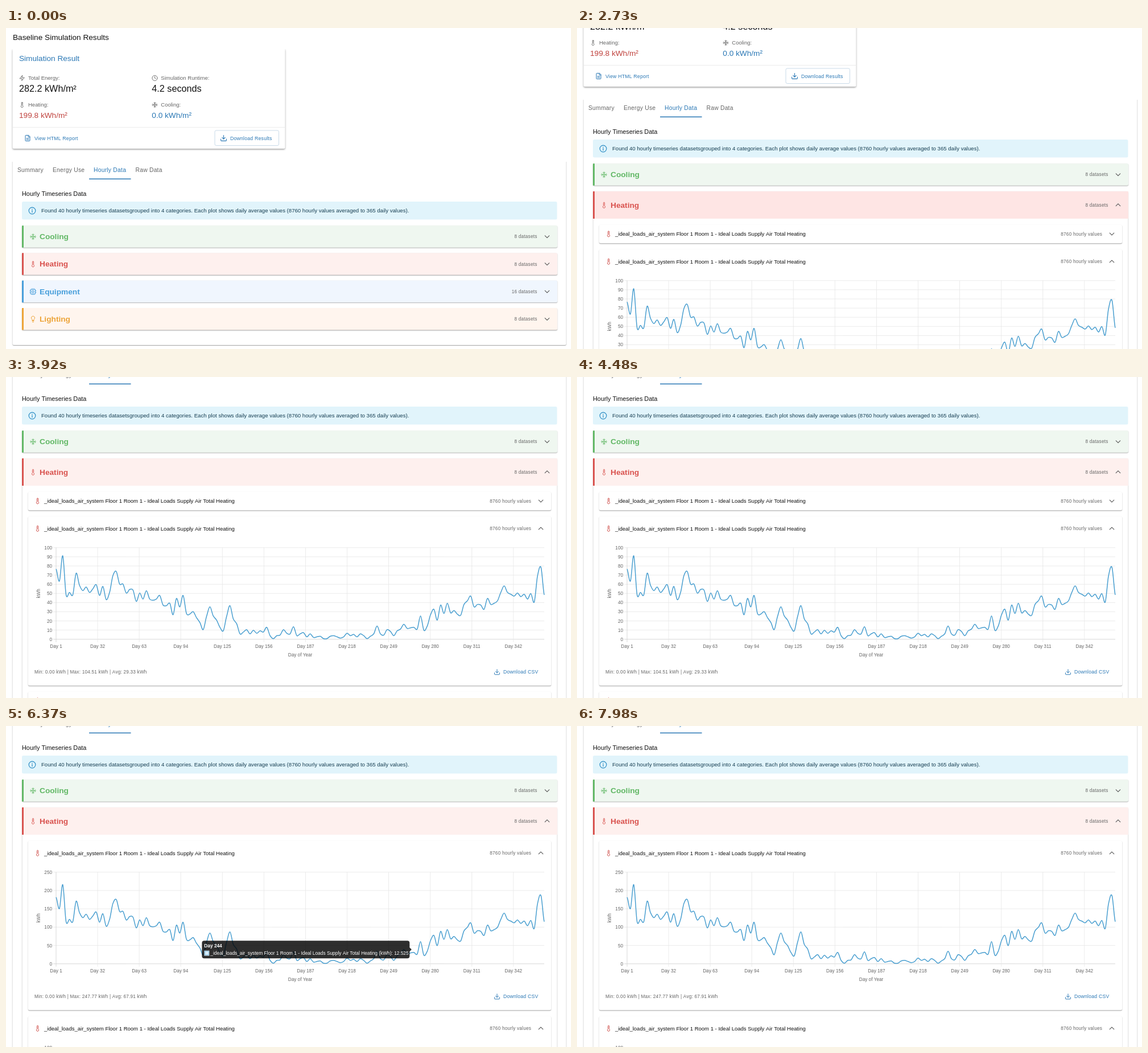
Animation of 993 by 564 pixels, one loop 8000 ms. Source, as an HTML page with a canvas:

```html
<!DOCTYPE html>
<html lang="en">
<head>
<meta charset="utf-8">
<title>Baseline Simulation Results</title>
<style>
html, body { margin: 0; width: 100%; height: 100%; overflow: hidden; background: #fff; }
canvas { display: block; width: 993px; height: 564px; }
</style>
</head>
<body>
<canvas id="stage"></canvas>
<script>
const W = 993, H = 564, LOOP = 8000, STEP = 70;
const canvas = document.getElementById('stage');
const ratio = window.devicePixelRatio || 1;
canvas.width = W * ratio;
canvas.height = H * ratio;
const c = canvas.getContext('2d');

const BLUE = '#2b78b5', GREY = '#666', RED = '#cf4f4a', LINE = '#4a9fd0';
const NAME = '_ideal_loads_air_system Floor 1 Room 1 - Ideal Loads Supply Air Total Heating';

const ICONS = {
  zap: 'M13 2 3 14h9l-1 8 10-12h-9z',
  clock: 'M22 12a10 10 0 1 1-20 0a10 10 0 1 1 20 0M12 6v6l4 2',
  info: 'M22 12a10 10 0 1 1-20 0a10 10 0 1 1 20 0M12 17v-6M12 7v1',
  thermo: 'M14 4v10.5a4 4 0 1 1-4 0V4a2 2 0 0 1 4 0z',
  snow: 'M2 12h20M12 2v20M20 16l-4-4 4-4M4 8l4 4-4 4M16 4l-4 4-4-4M8 20l4-4 4 4',
  file: 'M15 2H6a2 2 0 0 0-2 2v16a2 2 0 0 0 2 2h12a2 2 0 0 0 2-2V7zM14 2v6h6M8 13h8M8 17h8',
  load: 'M21 15v4a2 2 0 0 1-2 2H5a2 2 0 0 1-2-2v-4M7 10l5 5 5-5M12 15V3',
  chip: 'M4 4h16v16H4zM9 9h6v6H9zM9 1v3M15 1v3M9 20v3M15 20v3M1 9h3M1 15h3M20 9h3M20 15h3',
  bulb: 'M15 15c0-2 .7-2.7 1.5-3.5A6 6 0 1 0 7.500 11.500C8.300 12.300 9 13 9 15zM9 18h6M10 22h4',
  chevron: 'M5 9l7 7 7-7'
};

// Daily heating demand at even steps through the year, as plot height.
const demand = [
  117, 97, 139, 74, 78, 74, 110, 90, 81, 87, 78, 84, 91, 73, 88, 66, 78, 106, 113, 92, 92,
  77, 83, 82, 63, 77, 67, 81, 67, 65, 67, 73, 57, 56, 60, 41, 68, 54, 73, 43, 42,
  46.053, 36, 28, 16, 38, 54, 39, 32, 20, 14, 38, 56, 34, 26, 9, 12, 16, 9, 15, 10,
  14, 12, 20, 6, 1, 6, 7, 16, 10, 9, 21, 6, 9, 11, 4, 9, 3, 4, 5, 1,
  1, 5, 6, 4, 2, 4, 10, 6, 8, 4, 9, 6, 1, 5, 9, 22, 9, 7, 16, 13,
  6, 14, 17, 25, 18, 19, 20, 17, 39, 15, 22, 41, 50, 32, 57, 43, 60, 44, 48, 42,
  40, 58, 64, 72, 54, 58, 57, 50, 68, 58, 60, 64, 78, 89, 78, 75, 72, 77, 71, 75,
  67, 76, 62, 106, 120, 74];
const LEFT = 88, WIDTH = 858, PLOT = 161, LAST = demand.length - 1;

const clamp = p => Math.max(0, Math.min(1, p));
const mix = (a, b, p) => a + (b - a) * p;
const ease = p => { p = clamp(p); return p * p * (3 - 2 * p); };

function text(s, x, y, size, color = '#111', o = {}) {
  c.font = `${o.bold ? 'bold ' : ''}${size}px "Liberation Sans", Arial, sans-serif`;
  c.letterSpacing = (o.gap || 0) + 'px';
  c.textAlign = o.align || 'left';
  c.fillStyle = color;
  c.fillText(s, x, y + size * 0.36);
}
const caption = (s, x, y, align) => text(s, x, y, 8.2, GREY, { gap: 0.22, align });
const button = (s, x, y) => text(s, x, y, 8.7, BLUE, { gap: 0.22 });

function icon(name, x, y, size, color, turn = 0) {
  c.save();
  c.translate(x, y);
  c.rotate(turn * Math.PI);
  c.scale(size / 24, size / 24);
  c.translate(-12, -12);
  c.strokeStyle = color;
  c.lineWidth = 2;
  c.lineCap = c.lineJoin = 'round';
  c.stroke(new Path2D(ICONS[name]));
  c.restore();
}
const chevron = (x, y, open) => icon('chevron', x, y, 13, '#555', -open);

function rect(x, y, w, h, color) {
  c.fillStyle = color;
  c.fillRect(x, y, w, h);
}
function line(x1, y1, x2, y2, color, width = 0.8) {
  c.strokeStyle = color;
  c.lineWidth = width;
  c.beginPath();
  c.moveTo(x1, y1);
  c.lineTo(x2, y2);
  c.stroke();
}
function round(x, y, w, h, r, color) {
  c.fillStyle = color;
  c.beginPath();
  c.roundRect(x, y, w, h, r);
  c.fill();
}
function paper(x, y, w, h, color = '#fff', blur = 1.5, drop = 0.9) {
  c.save();
  c.shadowColor = 'rgba(0,0,0,.38)';
  c.shadowBlur = blur * ratio;
  c.shadowOffsetY = drop * ratio;
  round(x, y, w, h, 2.5, color);
  c.restore();
}

function result() {
  text('Baseline Simulation Results', 12, 16.5, 13.63);
  paper(11.5, 36, 479, 176, '#fff', 3, 1.4);
  rect(8, 30, 486, 7, '#fff');
  text('Simulation Result', 23, 53.5, 13.63, BLUE);
  const stats = [
    ['zap', 'Total Energy:', '282.2 kWh/m²', 0, 0, '#111', 16.2],
    ['clock', 'Simulation Runtime:', '4.2 seconds', 1, 0, '#111', 16.2],
    ['thermo', 'Heating:', '199.8 kWh/m²', 0, 1, '#c0443f', 13.65],
    ['snow', 'Cooling:', '0.0 kWh/m²', 1, 1, BLUE, 13.65]];
  for (const [sign, label, value, col, row, color, size] of stats) {
    const x = 23 + col * 233.3, y = 87.5 + row * 47;
    icon(sign, x + 5.2, y + 0.5, 11, GREY);
    text(label, x + 16, y, 9.5, GREY);
    text(value, x, y + 18.5, size, color);
  }
  line(11, 174.5, 491, 174.5, '#e8e8e8');
  icon('file', 38, 193.5, 12, BLUE);
  button('View HTML Report', 50, 193.5);
  c.strokeStyle = '#c3d6e6';
  c.lineWidth = 0.9;
  c.beginPath();
  c.roundRect(367, 180, 112.5, 26.5, 2.5);
  c.stroke();
  icon('load', 382.5, 193.5, 13, BLUE);
  button('Download Results', 394, 193.5);
}

function panel(bottom) {
  paper(11.5, 232, 973, bottom - 232);
  rect(5, 226, 985, 9, '#fff');
  [['Summary', 20], ['Energy Use', 82], ['Hourly Data', 154], ['Raw Data', 227.5]].forEach(([s, x], i) =>
    text(s, x, 249.5, 10.3, i === 2 ? BLUE : GREY, { gap: 0.25 }));
  rect(146, 264.5, 73.5, 1.5, BLUE);
  text('Hourly Timeseries Data', 28, 291.5, 10.9);
  round(28, 305, 940.5, 31.5, 2.5, '#e1f4fb');
  icon('info', 46, 321, 14, '#2a8cc4');
  text('Found 40 hourly timeseries datasetsgrouped into 4 categories. Each plot shows daily average values ' +
    '(8760 hourly values averaged to 365 daily values).', 62, 320.5, 9.62, '#173f52');
}

function section(y, h, sign, label, count, color, bg, open = 0) {
  if (open < 1) paper(28, y, 941, h, bg);
  else rect(28, y, 941, h, bg);
  rect(28, y, 3, h, color);
  const mid = y + h / 2;
  icon(sign, 47.5, mid + 0.3, 12, color);
  text(label, 59, mid, 13.7, color, { bold: true });
  caption(count + ' datasets', 933.5, mid, 'right');
  chevron(951, mid, open);
}

function plot(top, max, step, scale) {
  const base = top + PLOT;
  for (let v = 0; v <= max; v += step) {
    const y = base - v / max * PLOT;
    line(83, y, LEFT + WIDTH, y, v ? '#e6e6e6' : '#cfcfcf');
    text(v, 81, y, 8.2, GREY, { align: 'right' });
  }
  for (let day = 1; day < 365; day += 31) {
    const x = LEFT + (day - 1) / 364 * WIDTH;
    line(x, top, x, base + 5, day > 1 ? '#e6e6e6' : '#cfcfcf');
    text('Day ' + day, x, base + 12, 8.2, GREY, { align: 'center' });
  }
  text('Day of Year', 517, base + 27, 8.2, GREY, { align: 'center' });
  c.save();
  c.translate(57, top + PLOT / 2);
  c.rotate(-Math.PI / 2);
  text('kWh', 0, 0, 8.2, GREY, { align: 'center' });
  c.restore();

  const dx = WIDTH / LAST, pull = 0.15;
  const at = i => base - demand[Math.max(0, Math.min(LAST, i))] * scale;
  c.beginPath();
  c.moveTo(LEFT, at(0));
  for (let i = 0; i < LAST; i++) {
    const x = LEFT + i * dx;
    c.bezierCurveTo(
      x + dx * 0.34, Math.min(base, at(i) + (at(i + 1) - at(i - 1)) * pull),
      x + dx * 0.66, Math.min(base, at(i + 1) - (at(i + 2) - at(i)) * pull),
      x + dx, at(i + 1));
  }
  c.strokeStyle = LINE;
  c.lineWidth = 1.5;
  c.lineJoin = 'round';
  c.stroke();
}

function dataset(y, open, first) {
  const h = 32.5 + 265 * open, mid = y + 16 + 5.5 * open;
  paper(39, y, 919, h);
  icon('thermo', 55.5, mid, 12, RED);
  text(NAME, 67, mid, 9.52);
  caption('8760 hourly values', 923, mid, 'right');
  chevron(940, mid, open);
  if (open) {
    c.save();
    c.beginPath();
    c.rect(39, y, 919, h);
    c.clip();
    if (first) plot(mid + 33.5, 250, 50, 1);
    else plot(mid + 33.5, 100, 10, 1.0545);
    caption(first ? 'Min: 0.00 kWh | Max: 247.77 kWh | Avg: 67.91 kWh'
      : 'Min: 0.00 kWh | Max: 104.51 kWh | Avg: 29.33 kWh', 50, mid + 252);
    icon('load', 863, mid + 252, 12, BLUE);
    button('Download CSV', 874, mid + 252);
    c.restore();
  }
  return y + h + 10.5;
}

// Pointer position along the first plot, as a day of the year.
const moves = [[6058, 323], [6930, 102], [7030, 86], [7200, 86], [7500, 126]];
function pointerDay(t) {
  let day = moves[0][1];
  for (let i = 1; i < moves.length; i++) {
    const [t0, a] = moves[i - 1], [t1, b] = moves[i];
    if (t > t0) day = mix(a, b, clamp((t - t0) / (t1 - t0)));
  }
  return Math.round(day);
}
function heightAt(day) {
  const f = (day - 1) / 364 * LAST, i = Math.floor(f);
  return mix(demand[i], demand[Math.min(LAST, i + 1)], f - i);
}

function tooltip(t, base) {
  const alpha = Math.min(clamp((t - 5856) / 200), clamp((7980 - t) / 200));
  if (!alpha) return;
  const boxW = 365, boxH = 31, gap = 8, n = 11;
  let x = 0, y = 2;
  for (let k = 0; k < n; k++) {   // the box trails the pointer
    const day = pointerDay(t - k * 19);
    const tip = LEFT + (day - 1) / 364 * WIDTH;
    x += (day > 183 ? tip - gap - boxW : tip + gap) / n;
    y += (base - heightAt(day)) / n;
  }
  const day = pointerDay(t), right = day > 183;
  c.save();
  c.globalAlpha = alpha;
  const edge = right ? x + boxW : x, tip = right ? 3.5 : -3.5;
  c.fillStyle = 'rgba(0,0,0,.82)';
  c.beginPath();
  c.roundRect(x, y - boxH / 2, boxW, boxH, 4);
  c.moveTo(edge, y - 3.5);
  c.lineTo(edge + tip, y);
  c.lineTo(edge, y + 3.5);
  c.fill();
  text('Day ' + day, x + 4, y - 7, 8.3, '#fff', { bold: true });
  rect(x + 4, y + 2, 9, 9, '#fff');
  rect(x + 4.7, y + 2.7, 7.6, 7.6, LINE);
  rect(x + 5.4, y + 3.4, 6.2, 6.2, '#d9edf8');
  text(`${NAME} (kWh): ${(heightAt(day) / 0.644).toFixed(3)}`, x + 15, y + 6.7, 8.35, '#fff');
  c.restore();
}

function draw(t) {
  const open = ease((t - 1400) / 350);
  const firstOpen = ease((t - 4970) / 350);
  const scroll = Math.round(253 * (1 - Math.pow(1 - clamp((t - 2450) / 980), 1.68)));
  const hover = t < 1470 ? 0 : 1 - clamp((t - 3500) / 140);

  c.setTransform(ratio, 0, 0, ratio, 0, 0);
  rect(0, 0, W, H, '#fff');
  c.translate(0, -scroll);

  const top = mix(395.3, 396, open), headH = mix(38.5, 48, open);
  const body = (10.5 + 8 * 43 + 265 * (1 + firstOpen)) * open;
  const next = top + headH + body + 9.9;
  result();
  panel(next + 48.3 + 65);
  section(347.2, 38.5, 'snow', 'Cooling', 8, '#62b866', '#eff7f0');

  if (open) {
    const end = top + headH + body;
    paper(28.5, top, 940, end - top, '#fff', 1.5, 0.7);
    c.save();
    c.beginPath();
    c.rect(28, top + headH, 941, body);
    c.clip();
    let y = top + headH + 10.8;
    for (let i = 0; i < 8 && y < scroll + H; i++)
      y = dataset(y, i === 0 ? firstOpen : i === 1 ? 1 : 0, i === 0);
    c.restore();
  }
  const tint = `rgb(254,${mix(240, 229, hover)},${mix(238, 228, hover)})`;
  section(top, headH, 'thermo', 'Heating', 8, '#d9534f', tint, open);
  section(next, 38.5, 'chip', 'Equipment', 16, '#489fdb', '#f0f6fe');
  section(next + 48.3, 38.5, 'bulb', 'Lighting', 8, '#eda438', '#fff5ee');
  tooltip(t, 418 + scroll);
}

function frame(now) {
  draw(Math.floor(now % LOOP / STEP) * STEP);
  requestAnimationFrame(frame);
}
requestAnimationFrame(frame);
</script>
</body>
</html>
```
